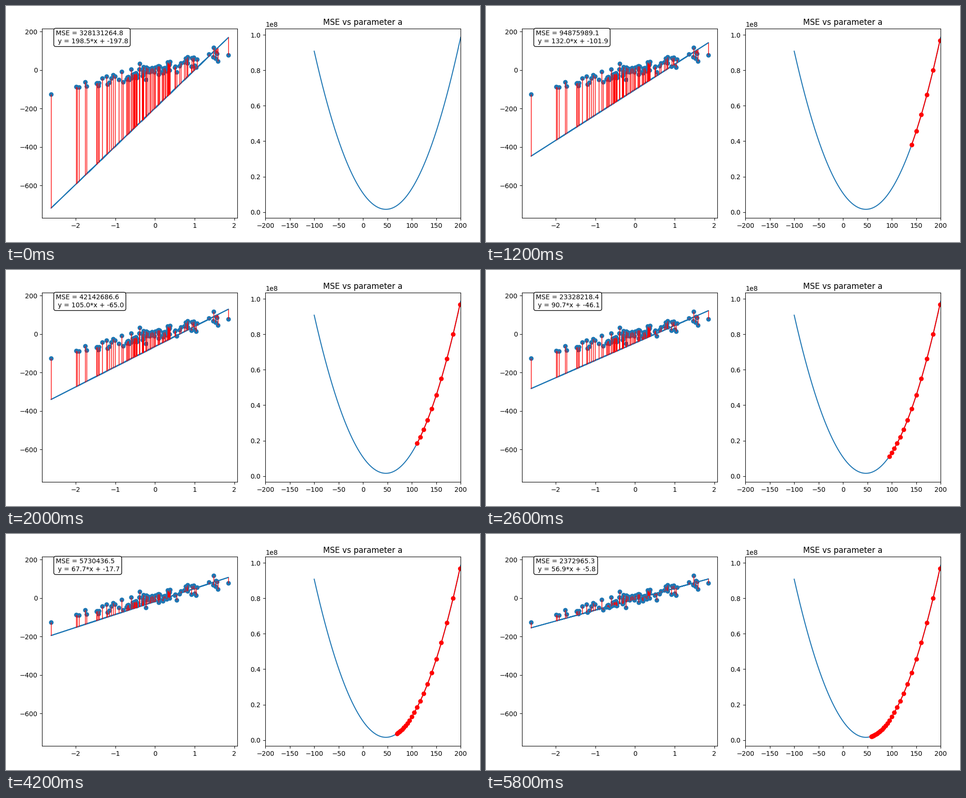
A matplotlib script that plays this animation: 1000x500 px, repeating every 6000 ms.

```python
import numpy as np
import matplotlib.pyplot as plt
from matplotlib.animation import FuncAnimation

FRAMES, INTERVAL = 30, 200
STEPS, RATE = 10, 0.01
N = 100

# Noisy linear data, shuffled
rng = np.random.RandomState(42)
x = rng.standard_normal(N)
slope = 100 * rng.uniform()
y = slope * x + rng.normal(scale=20, size=N)
order = np.arange(N)
rng.shuffle(order)
x, y = x[order], y[order]


def cost(a, b):
    return N / 2 * np.sum((a * x + b - y) ** 2)


def descend(a, b, count):
    path = [(a, b)]
    for _ in range(count):
        err = a * x + b - y
        a, b = a - RATE * np.mean(err * x), b - RATE * np.mean(err)
        path.append((a, b))
    return path


path = descend(200, -200, STEPS * FRAMES)
shown = path[1::STEPS]
trail_a = np.array([a for a, b in shown])
trail_c = np.array([cost(a, 0) for a in trail_a])

fig = plt.figure(figsize=(10, 5), dpi=100)
left = fig.add_axes([0.0762, 0.102, 0.412, 0.802])
right = fig.add_axes([0.5472, 0.102, 0.412, 0.802])

# Limits come from the starting line
left.scatter(x, y)
line, = left.plot(x, 200 * x - 200)
bars = left.vlines(x, y, 200 * x - 200, color="r", lw=1)
left.set_xlim(left.get_xlim())
left.set_ylim(left.get_ylim())
label = left.text(-2.5, 140, "", bbox=dict(boxstyle="round", fc="white"))

grid = np.linspace(-100, 200, 301)
right.plot(grid, [cost(a, 0) for a in grid])
trail, = right.plot([], [], "ro-")
right.set_xlim(-200, 200)
right.set_title("MSE vs parameter a")


def update(i):
    a, b = shown[i]
    fit = a * x + b
    line.set_data(x, fit)
    bars.set_segments([[(u, v), (u, w)] for u, v, w in zip(x, y, fit)])
    label.set_text(f"MSE = {cost(a, b):.1f}\n y = {a:.1f}*x + {b:.1f}")
    trail.set_data(trail_a[:i], trail_c[:i])
    return line, bars, label, trail


anim = FuncAnimation(fig, update, frames=FRAMES, interval=INTERVAL,
                     init_func=lambda: update(0), repeat=True, repeat_delay=0)
plt.show()
```
